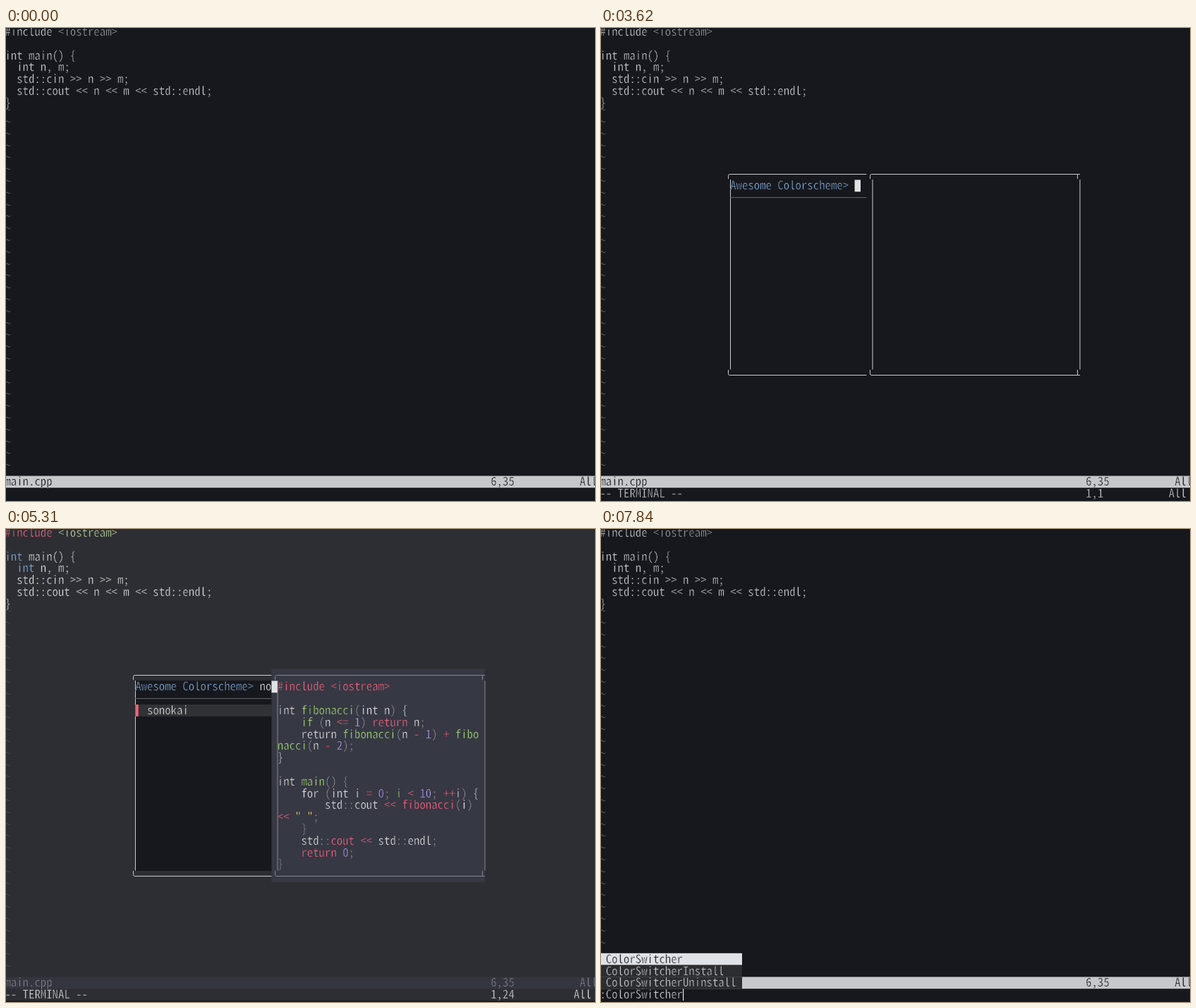
Animation of 835 by 671 pixels, one loop 8000 ms. Source, as an HTML page:

```html
<!DOCTYPE html>
<html lang="en">
<head>
<meta charset="utf-8">
<title>Colour scheme switcher</title>
<style>
  html, body { margin: 0; width: 100%; height: 100%; overflow: hidden; background: #16181d; }
  svg { display: block; width: 835px; height: 671px; }
  rect { stroke: none; }
  /* The stroke takes the paper colour, which thins the glyphs. */
  text { white-space: pre; text-rendering: geometricPrecision; stroke-width: .4px;
         font-family: "Noto Sans Mono CJK JP", "Noto Sans Mono", "DejaVu Sans Mono", monospace; }
</style>
</head>
<body>
<svg id="stage" viewBox="0 0 835 671"></svg>
<script>
const LOOP = 8000;
const CW = 8.4, CH = 16.8, LEFT = -1.6, TOP = -3, BASE = 14;
const PANEL = '#16181d', SOFT = '#303235';
const stage = document.getElementById('stage');

// Pick the font size whose advance equals one terminal cell.
const pen = document.createElement('canvas').getContext('2d');
pen.font = '100px "Noto Sans Mono CJK JP", "Noto Sans Mono", "DejaVu Sans Mono", monospace';
stage.style.fontSize = CW * 100 / pen.measureText('m').width + 'px';

// Colour schemes; one-letter keys colour the [k...] tokens below.
const schemes = {
  dark: {
    bg: '#16181d', fg: '#c9cbd0', tilde: '#6b6e74', bar: '#c6c8cc', barFg: '#1b1d22',
    h: '#93969c', pane: '#16181d', edge: '#c9cbd0', mark: '#c9cbd0'
  },
  noir: {
    bg: '#000', fg: '#bcbcbc', tilde: '#808080', bar: '#303030', barFg: '#050505',
    P: '#eee', h: '#7e98b8', pane: '#06070d', edge: '#c4c4c4', mark: '#f00000',
    ink: '#000', n: '#e00000', p: '#d0d0d0'
  },
  snow: {
    bg: '#2c2e32', fg: '#cfd1d5', tilde: '#c0c2c5', bar: '#35383c', barFg: '#cfd1d5',
    P: '#62a89c', h: '#8ba3c4', pane: '#06080d', edge: '#c4c6ca', mark: '#c89678',
    p: '#86a778', f: '#bd7c80', c: '#bd7c80', o: '#86a778', n: '#84a3cc', r: '#86a778',
    g: '#86a778', s: '#84a3cc', b: '#c6a480', k: '#c6a480', e: '#86a778'
  },
  sonokai: {
    bg: '#2d2e33', fg: '#dcdde0', tilde: '#4c4e54', bar: '#34363f', barFg: '#7c7f87',
    P: '#f0617d', h: '#b5cf9a', t: '#7ba3cf', pane: '#363843', edge: '#858892', mark: '#f0617d',
    p: '#f0617d', f: '#9ed072', c: '#9ed072', o: '#f0617d', n: '#b39df3', r: '#f0617d',
    g: '#f0617d', s: '#e0c66b', b: '#8a8d96', e: '#9ed072', x: '#f0617d'
  }
};

const source = [
  '[P#include] [h<iostream>]', '', '[tint] main() {', '  [tint] n, m;',
  '  std::cin >> n >> m;', '  std::cout << n << m << std::endl;', '}'
];
const preview = [
  '[p#include <iostream>]', '',
  'int [ffibonacci][b(]int n[b)] [k{]',
  '    [cif] [b(]n [o<=] [n1][b)] [rreturn] n[b;]',
  '    return [ffibonacci][b(]n [o-] [n1][b)] [o+] [ffibo]',
  '[fnacci][b(]n [o-] [n2][b);]', '[k}]', '',
  'int [fmain][b()] [b{]',
  '    for [b(]int i [o=] [n0][b;] [ei] [o<] [n10][b;] [o++]i[b)] [k{]',
  '        std[b::]cout [o<<] [gfibonacci][b(]i[b)]',
  '[o<<] [s" "][b;]', '    [b}]',
  '    std[b::][xcout] [o<<] std[b::]endl[b;]',
  '    [rreturn] [n0][b;]', '[b}]'
];
const lists = {
  all: '256_noir OceanicNext OceanicNextLight PaperColor abstract afterglow alduin anderson angr apprentice archery atom ayu carbonized-dark',
  s: 'snow sierra sonokai scheakur seoul256 spacecamp sunbather solarized8 stellarized seoul256-light solarized8_low space-vim-dark spacecamp_lite solarized8_flat',
  so: 'sonokai solarized8 solarized8_low solarized8_flat solarized8_high snow seoul256 seoul256-light stonewashed-256 stonewashed-dark sorbet',
  son: 'sonokai stonewashed-256 stonewashed-dark',
  sono: 'sonokai'
};

const cmd = text => ({ cmd: text });
const steps = [
  [0, {}],
  [1050, { block: true }],
  [1180, cmd(':')],
  [1600, cmd(':C')],
  [1880, cmd(':Co')],
  [2020, cmd(':Col')],
  [2160, cmd(':Colo')],
  [2230, { cmd: ':ColorSwitcher', menu: true }],
  [2780, cmd(':ColorSwitcher ')],
  [3200, cmd(':ColorSwitcher -popup')],
  [3620, { query: '', pos: '1,1' }],
  [3690, { scheme: 'noir', query: '', list: 'all', pos: '1,0-22' }],
  [4890, { scheme: 'snow', query: 's', list: 's', pos: '1,23' }],
  [5030, { scheme: 'sonokai', query: 'so', list: 'so', pos: '1,24' }],
  [5170, { scheme: 'sonokai', query: 'on', list: 'son', pos: '1,24' }],
  [5310, { scheme: 'sonokai', query: 'no', list: 'sono', pos: '1,24' }],
  [6150, { block: true }],
  [7000, cmd(':')],
  [7350, cmd(':C')],
  [7490, cmd(':Co')],
  [7630, cmd(':Col')],
  [7700, cmd(':Colo')],
  [7840, { cmd: ':ColorSwitcher', menu: true }]
];

const colX = col => LEFT + col * CW;
const rowY = row => TOP + row * CH;
const esc = s => s.replace(/&/g, '&amp;').replace(/</g, '&lt;').replace(/>/g, '&gt;');
const rect = (x, y, w, h, fill) =>
  `<rect x="${x}" y="${y}" width="${w}" height="${h}" fill="${fill}"/>`;
const cells = (col, row, w, h, fill) => rect(colX(col), rowY(row), w * CW, h * CH, fill);
const stroke = (d, color) => `<path d="${d}" fill="none" stroke="${color}"/>`;
const on = (paper, body) => `<g stroke="${paper}">${body}</g>`;
const label = (col, row, body, fill, dy = 0) =>
  `<text x="${colX(col)}" y="${rowY(row) + BASE + dy}" fill="${fill}">${body}</text>`;
const say = (col, row, text, fill) => label(col, row, esc(text), fill);

function codeLine(col, row, line, look) {
  const body = line.trimStart();
  if (!body) return '';
  const start = col + line.length - body.length;
  const spans = body.split(/(\[[^\]]+\])/).map(part =>
    part[0] === '['
      ? `<tspan fill="${look[part[1]] || look.fg}">${esc(part.slice(2, -1))}</tspan>`
      : esc(part)).join('');
  return label(start, row, spans, look.fg);
}

function editor(state, look) {
  let text = '';
  source.forEach((line, i) => text += codeLine(0, i, line, look));
  for (let row = 7; row < 38; row++) text += label(0, row, '~', look.tilde, -6.5);
  const status = say(0, 38, 'main.cpp', look.barFg)
    + say(82, 38, '6,35', look.barFg) + say(97, 38, 'All', look.barFg);
  return rect(0, 0, 835, 669.2, look.bg) + on(look.bg, text)
    + cells(0, 38, 100, 1, look.bar) + on(look.bar, status)
    + (state.block ? cells(34, 5, 1, 1, look.bar) : '');
}

function commandLine(state, look) {
  let out = on(look.bg, say(0, 39, state.cmd, look.fg))
    + rect(colX(state.cmd.length), rowY(39), 1.2, CH, '#e0e2e6');
  if (state.menu) {
    ['', 'Install', 'Uninstall'].forEach((end, i) => {
      const [paper, ink] = i ? ['#2b2d30', '#c4c6ca'] : ['#dfe2e6', '#25272c'];
      out += cells(0, 36 + i, 24, 1, paper)
        + on(paper, say(1, 36 + i, 'ColorSwitcher' + end, ink));
    });
  }
  return out;
}

function finder(state, look) {
  const items = state.list ? lists[state.list].split(' ') : [];
  const prompt = say(22, 13, 'Awesome Colorscheme>', '#7fa5cf')
    + say(43, 13, state.query, '#d3d5d9');
  let out = rect(183, 215, 194, 270, PANEL)
    + stroke('M377 207.5H182.5Q180.5 207.5 180.5 209.5V214M183.5 215V484.5M180.5 485V490.5Q180.5 492.5 182.5 492.5H377', '#c9cbd0')
    + on(PANEL, prompt)
    + stroke('M183 240.5H377', '#606368');
  items.forEach((name, i) => {
    const row = 15 + i;
    const body = i && state.query
      ? `<tspan fill="#87af87">${name[0]}</tspan>${name.slice(1)}` : name;
    out += cells(22, row, i ? 1 : 23, 1, SOFT)
      + on(i ? PANEL : SOFT, label(24, row, body, i ? '#bfc1c5' : '#d3d5d9'));
  });
  if (items.length) out += rect(183.5, rowY(15), 4.2, CH, look.mark);
  return out;
}

function previewPane(state, look) {
  let out = cells(45, 12, 36, 18, look.pane)
    + stroke('M679 207.5H383.5Q381.5 207.5 381.5 209.5V214M675.5 207.5V214M385 215V484.5M679 215V484.5M381.5 485V490.5Q381.5 492.5 383.5 492.5H679M675.5 485V492.5', look.edge);
  if (!state.list) return out;
  preview.forEach((line, i) => {
    const plain = line.replace(/\[.([^\]]+)\]/g, '$1');
    const pad = plain.length - plain.trimStart().length;
    if (look.ink && plain) out += cells(46 + pad, 13 + i, plain.length - pad, 1, look.ink);
    out += on(look.ink || look.pane, codeLine(46, 13 + i, line, look));
  });
  return out;
}

function draw(state) {
  const look = schemes[state.scheme || 'dark'];
  let out = editor(state, look);
  if (state.cmd) out += commandLine(state, look);
  if (state.pos) {
    const mode = say(0, 39, '-- TERMINAL --', look.fg)
      + say(82, 39, state.pos, look.fg) + say(96, 39, 'All', look.fg);
    out += on(look.bg, mode) + finder(state, look) + previewPane(state, look)
      + cells(43 + state.query.length, 13, 1, 1, '#e0e3e6');
  }
  stage.innerHTML = out;
}

let shown = -1;
const began = performance.now();
function tick() {
  const t = (performance.now() - began) % LOOP;
  const now = steps.findLastIndex(([at]) => at <= t);
  if (now !== shown) draw(steps[shown = now][1]);
  requestAnimationFrame(tick);
}
tick();
</script>
</body>
</html>
```
